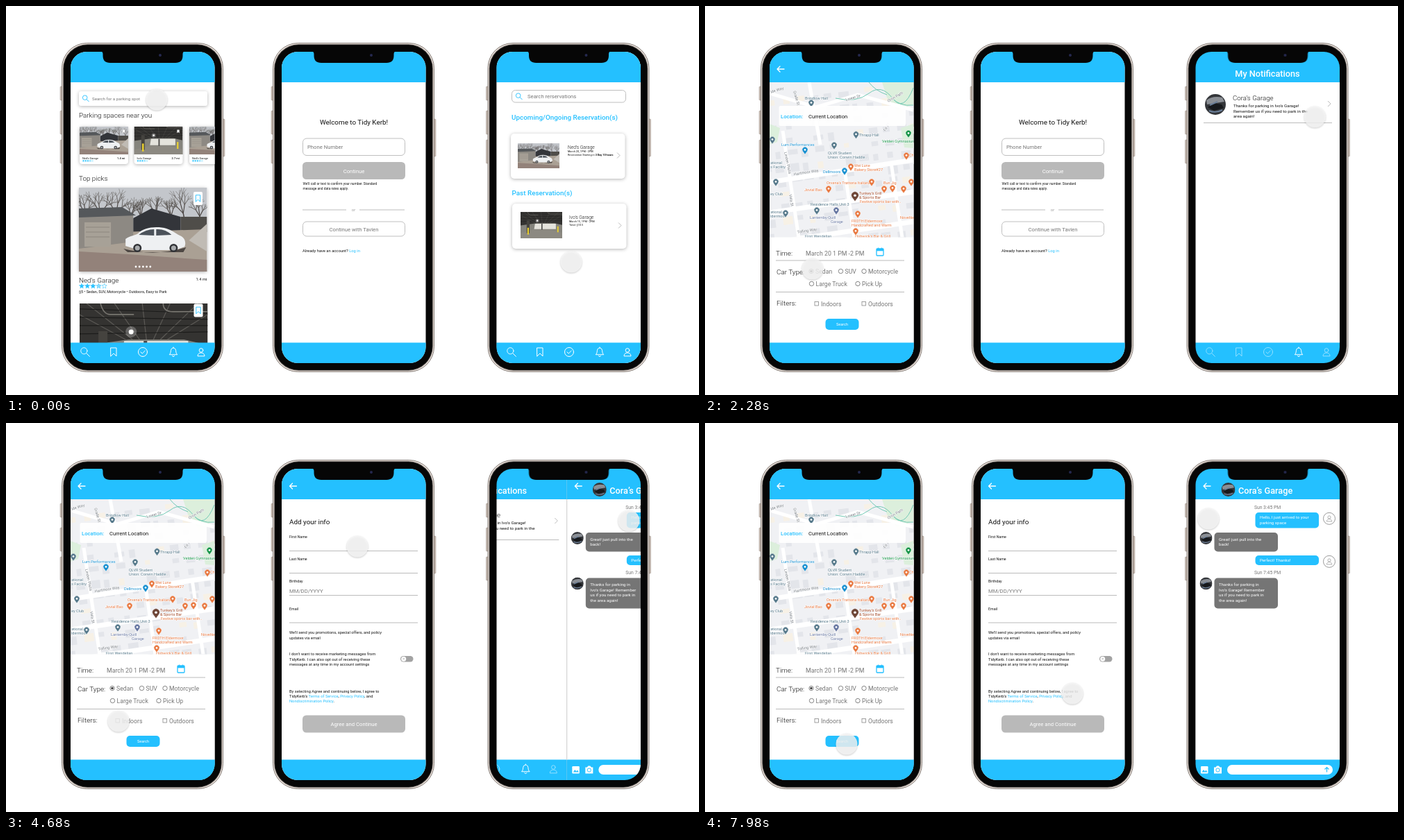
An HTML page for the animation above (8 s loop, 998 by 561 pixels).

```html
<!DOCTYPE html>
<html lang="en">
<head>
<meta charset="utf-8">
<title>Parking app screens</title>
<style>
html, body { margin: 0; width: 100%; height: 100%; overflow: hidden; background: #fff; }
#stage { display: block; width: 100%; height: 100%; }
text { font-family: Roboto, sans-serif; fill: #111; white-space: pre; }
.light { font-weight: 300; }
.medium { font-weight: 500; }
.mid { text-anchor: middle; }
text.blue, tspan.blue { fill: #24c0ff; }
text.gray { fill: #777; }
text.white { fill: #fff; }
.map text { paint-order: stroke; stroke: #fff; stroke-width: 1px; }
.blueFill { fill: #24c0ff; }
.line { fill: none; stroke: #aaa; stroke-width: .8; }
.icon { fill: none; stroke: #fff; stroke-width: 1; stroke-linejoin: round; stroke-linecap: round; }
.card { fill: #fff; filter: drop-shadow(0 1px 2.5px rgba(0,0,0,.3)); }
.touch { fill: #f6f6f6; fill-opacity: .82; filter: drop-shadow(0 1.5px 1.2px rgba(0,0,0,.24)); }

#sheet, #strip, #reservations, #welcome, #info, #hint, #arrow, #touch1, #touch2, #touch3, #touch2Show {
  animation: 8s ease-in-out infinite;
}
#sheet { animation-name: sheet; }
#strip { animation-name: strip; }
#reservations { animation-name: reservations; }
#welcome { animation-name: welcome; }
#info, #touch2Show { animation-name: info; }
#hint { animation-name: hint; }
#arrow { animation-name: arrow; }
#touch1 { animation-name: touch1; }
#touch2 { animation-name: touch2; }
#touch3 { animation-name: touch3; }

@keyframes sheet {
  0% { transform: translateY(449px); }
  7.52% { transform: translateY(449px); animation-timing-function: ease-out; }
  11.27%, 100% { transform: none; }
}
@keyframes strip {
  0% { transform: translateX(0); }
  57.19% { transform: translateX(0); animation-timing-function: ease-out; }
  60.94%, 100% { transform: translateX(-208px); }
}
@keyframes reservations { 0%, 18.74% { visibility: visible; } 18.75%, 100% { visibility: hidden; } }
@keyframes welcome { 0%, 48.74% { visibility: visible; } 48.75%, 100% { visibility: hidden; } }
@keyframes info { 0%, 48.74% { visibility: hidden; } 48.75%, 100% { visibility: visible; } }
@keyframes hint { 0%, 41.5% { opacity: 0; } 42.5%, 44.5% { opacity: .65; } 46%, 100% { opacity: 0; } }
@keyframes arrow {
  0%, 37.99% { visibility: hidden; }
  38%, 48.74% { visibility: visible; }
  48.75%, 100% { visibility: hidden; }
}
@keyframes touch1 {
  0%, 11.5% { transform: translate(217px, 135px); }
  15%, 20% { transform: translate(192px, 294px); }
  30%, 36% { transform: translate(153px, 383px); }
  41%, 46% { transform: translate(188px, 388px); }
  58.5% { transform: translate(162px, 430px); }
  70.1%, 77% { transform: translate(172px, 434px); }
  90%, 100% { transform: translate(204px, 463px); }
}
@keyframes touch2 {
  0%, 49% { transform: translate(500px, 240px); }
  57%, 60% { transform: translate(506px, 178px); }
  69%, 75% { transform: translate(504px, 252px); }
  97%, 100% { transform: translate(529px, 390px); }
}
@keyframes touch3 {
  0%, 1% { transform: translate(814px, 369px); }
  8.6% { transform: translate(866px, 521px); }
  12%, 18% { transform: translate(858px, 501px); }
  30%, 43.2% { transform: translate(879px, 149px); }
  48%, 59% { transform: translate(897px, 141px); }
  70%, 75% { transform: translate(832px, 206px); }
  92%, 100% { transform: translate(725px, 138px); }
}
</style>
</head>
<body>
<svg id="stage" viewBox="0 0 998 561"></svg>
<script>
let seed = 48271;
const rand = (a, b) => {
  seed = (seed * 16807) % 2147483647;
  return a + (b - a) * seed / 2147483647;
};
const repeat = (n, fn) => Array.from({ length: n }, (_, i) => fn(i)).join('');
const text = (x, y, size, str, cls = '') =>
  `<text x="${x}" y="${y}" font-size="${size}" class="${cls}">${str}</text>`;
const lines = (x, y, step, size, list, cls) =>
  list.map((str, i) => text(x, y + i * step, size, str, cls)).join('');
const rect = (x, y, w, h, r = 0, attrs = '') =>
  `<rect x="${x}" y="${y}" width="${w}" height="${h}" rx="${r}" ${attrs}/>`;
const circle = (x, y, r, attrs = '') => `<circle cx="${x}" cy="${y}" r="${r}" ${attrs}/>`;
const path = (d, attrs = '') => `<path d="${d}" ${attrs}/>`;
const at = (x, y, body, attrs = '') => `<g transform="translate(${x} ${y})" ${attrs}>${body}</g>`;
const layer = (id, body) => `<g id="${id}">${body}</g>`;
const rule = (x1, x2, y) => path(`M${x1} ${y}H${x2}`, 'class="line"');
const photo = (id, x, y, w, h) =>
  `<use href="#${id}" x="${x}" y="${y}" width="${w}" height="${h}"/>`;
const outline = 'fill="#fff" stroke="#b8b8b8" stroke-width=".9"';
const blue = 'class="blueFill"';

const page = x => rect(x, 66, 208, 449, 0, 'fill="#fff"');
const bars = x => rect(x, 66, 208, 44, 0, blue) + rect(x, 485.5, 208, 30, 0, blue);
const backArrow = x =>
  path(`M${x + 5} 91h-10m4 -4l-4 4l4 4`, 'class="icon" style="stroke-width:1.3"');
const chevron = (x, y) =>
  path(`M${x - 2} ${y - 4}l4 4l-4 4`, 'fill="none" stroke="#aaa" stroke-width=".8"');
const lens = (x, y, r, color) =>
  path(`M${x + r * .5} ${y + r * .5}l${r} ${r}`, `stroke="${color}"`) +
  circle(x - r * .25, y - r * .25, r, `fill="none" stroke="${color}" stroke-width=".9"`);
const person = (x, y, attrs = '') =>
  at(x, y, circle(0, -2.5, 2.8) + path('M-5 5.5C-5 -.5 5 -.5 5 5.5Z'), attrs);
const bookmark = (x, y, s, attrs = '') =>
  path(`M${x - 4 * s} ${y - 6 * s}h${8 * s}v${12 * s}l${-4 * s} ${-4 * s}l${-4 * s} ${4 * s}z`, attrs);
const starPath = (x, y, r) => 'M' + Array.from({ length: 10 }, (_, i) => {
  const a = -Math.PI / 2 + i * Math.PI / 5, d = i % 2 ? r * .42 : r;
  return `${(x + d * Math.cos(a)).toFixed(2)} ${(y + d * Math.sin(a)).toFixed(2)}`;
}).join('L') + 'Z';
const stars = (x, y, r) => repeat(5, i => path(starPath(x + i * r * 2.15, y, r),
  `fill="${i < 3 ? '#24c0ff' : i < 4 ? '#91dfff' : '#fff'}" stroke="#24c0ff" stroke-width="${r * .14}"`));
const bell = path('M235.5 502.5c2 -1.5 1.5 -4 2 -6c.7 -4.5 6.3 -4.5 7 0c.5 2 0 4.5 2 6z' +
  'M239.5 504.5a1.6 1.6 0 0 0 3 0M241 493v-1');
const nav = (dx, opacity = 1) => at(dx, 0,
  `<g opacity="${opacity}">${lens(113.5, 498.5, 4.6, '#fff')}${bookmark(155, 499, 1)}` +
  circle(197, 499, 6.5) + path('M194 499l2.2 2.2l4 -4') + person(281, 499) + '</g>' + bell,
  'class="icon"');
const touch = id => circle(0, 0, 15.5, `id="${id}" class="touch"`);

/* photographs */
const branch = (x, y, length, angle, depth) => {
  const x2 = x + length * Math.cos(angle), y2 = y + length * Math.sin(angle);
  return path(`M${x.toFixed(1)} ${y.toFixed(1)}L${x2.toFixed(1)} ${y2.toFixed(1)}`,
    `stroke="#4a4441" stroke-width="${.4 + depth * .35}"`) +
    (depth ? repeat(3, i => branch(x2, y2, length * rand(.6, .85), angle + (i - 1) * .5 + rand(-.2, .2), depth - 1)) : '');
};
const trees = repeat(9, i => branch(10 + i * 20.5, 56, rand(14, 22), -Math.PI / 2 + rand(-.2, .2), 3));
const lot = `<symbol id="lot" viewBox="0 0 184 121" preserveAspectRatio="xMidYMid slice">
  ${rect(0, 0, 184, 121, 0, 'fill="#c3c6cb"')}
  ${trees}
  ${path('M78 44L104 30L146 42V72H78Z', 'fill="#33353a"')}
  ${rect(146, 42, 38, 22, 0, 'fill="#4f4d49"')}
  ${path('M0 66L184 60V121H0Z', 'fill="#aaa094"')}
  ${path('M0 92L70 96L184 104V121H0Z', 'fill="#93827a"')}
  ${path('M184 52L158 76L184 92Z', 'fill="#c0bbb4"')}
  ${path('M0 38H78V78L0 88Z', 'fill="#8d8983"')}
  ${path('M0 30L62 28L82 40L0 43Z', 'fill="#55585b"')}
  ${rect(8, 50, 38, 35, 0, 'fill="#a7a197"')}
  ${path('M10 57h34M10 64h34M10 71h34', 'stroke="#817b73" stroke-width=".7"')}
  ${path('M64 88Q110 100 154 86L150 93H70Z', 'fill="#4d4743"')}
  ${path('M67 74C74 69 81 69 85 66C93 57 112 55 126 59C135 62 140 67 147 70Q155 75 152 85L139 90L86 90L67 84Z', 'fill="#eef0f2"')}
  ${path('M86 68Q96 60 108 60V69ZM111 60Q124 59 133 68L111 69Z', 'fill="#4b525a"')}
  ${[84, 136].map(x => circle(x, 87, 6, 'fill="#303236"') + circle(x, 87, 3.5, 'fill="#a8abad"')).join('')}
</symbol>`;
const deck = `<symbol id="deck" viewBox="0 0 184 121" preserveAspectRatio="xMidYMid slice">
  ${rect(0, 0, 184, 121, 0, 'fill="#343331"')}
  ${path('M0 62L70 52H150L184 60V96L120 84H60L0 98Z', 'fill="#85847d"')}
  ${path('M64 54H156V78H60Z', 'fill="#e4e3dc"')}
  ${path('M0 96L60 80H130L184 94V121H0Z', 'fill="#8c8981"')}
  <g fill="none" stroke="#5c5a56" stroke-width="1.2">
    ${repeat(7, i => path(`M${-30 + i * 40} 0L${66 + i * 10} 52`))}
    ${repeat(4, i => path(`M0 ${8 + i * 12}L184 ${14 + i * 9}`, 'stroke="#1c1c1b"'))}
  </g>
  ${path('M30 0q4 16 14 16h34M120 0q0 12 14 12h50', 'fill="none" stroke="#77756f" stroke-width="1.6"')}
  ${circle(74, 41, 8, 'fill="#fff" opacity=".25"')}${circle(74, 41, 3.5, 'fill="#fff"')}
  ${rect(92, 54, 5, 27, 0, 'fill="#4c4b49"')}${rect(27, 40, 13, 56, 0, 'fill="#45433f"')}
  ${rect(30, 72, 7, 30, 0, 'fill="#e8cf31"')}${rect(162, 66, 6, 26, 0, 'fill="#e8cf31"')}
</symbol>`;
const avatar = `<symbol id="avatar" viewBox="-15 -15 30 30">
  ${circle(0, 0, 15, 'fill="#34363a"')}
  ${path('M-13 -6Q-4 -13 10 -10L13 -4L-12 0Z', 'fill="#8b8f95"')}
  ${path('M-11 4L-3 -2L9 0L12 5L-2 9Z', 'fill="#17191c"')}
  ${path('M-9 9Q0 13 10 8M-8 1L3 -4', 'stroke="#6b7f99" stroke-width="2" fill="none"')}
</symbol>`;

/* home */
const spot = (x, id, name, miles) => rect(x, 174, 70, 54, 4, 'class="card"') +
  photo(id, x, 174, 70, 40) + bookmark(x + 63.5, 181, .4, 'fill="#fff"') +
  text(x + 4, 220.5, 3.9, name) + text(x + 54, 220.5, 4, miles, 'medium') + stars(x + 5.5, 223.3, 1.5);
const badge = (x, y) => rect(x, y, 13, 19, 2, 'fill="#fff"') +
  bookmark(x + 6.5, y + 9.5, .8, 'fill="none" stroke="#24c0ff" stroke-width=".9"');
const home = page(93) +
  rect(105, 123, 185, 21, 3, 'class="card"') + lens(114.5, 133, 3.3, '#24c0ff') +
  text(124, 135.8, 6.2, 'Search for a parking spot', 'gray') +
  text(105, 160.5, 9.85, 'Parking spaces near you', 'light') +
  spot(106, 'lot', 'Ned’s Garage', '1.4 mi') + spot(184.5, 'deck', 'Ivo’s Garage', '2.7 mi') +
  spot(264, 'lot', 'Ned’s Garage', '1.4 mi') +
  text(105, 251.5, 9.9, 'Top picks', 'light') +
  rect(105, 262, 184.5, 121, 4, 'class="card"') +
  photo('lot', 105, 262, 184.5, 121) + badge(270, 268) +
  repeat(5, i => circle(187 + i * 5.2, 376, 1.4, 'fill="#fff"')) +
  text(105, 398.5, 9.9, 'Ned’s Garage', 'light') + text(273.5, 396, 5.8, '1.4 mi') +
  stars(109, 404, 3.8) +
  text(105, 414, 5.45, '$5 • Sedan, SUV, Motorcycle • Outdoors, Easy to Park') +
  photo('deck', 106, 429, 184.5, 121) + badge(270.5, 429.5) + bars(93) + nav(0);

/* map */
const pin = (x, y, color, s = 1) => at(x, y,
  path(`M0 ${6 * s}L${-3.3 * s} ${1.5 * s}A${4 * s} ${4 * s} 0 1 1 ${3.3 * s} ${1.5 * s}Z`,
    `fill="${color}" stroke="#fff" stroke-width=".5"`) + circle(0, -.6 * s, 1.4 * s, 'fill="#fff"'));
const label = (x, y, color, ...list) =>
  lines(x, y, 6, 5.6, list).replaceAll('<text', `<text style="fill:${color}"`);
const street = (x, y, turn, name) =>
  `<g transform="translate(${x} ${y}) rotate(${turn})">${label(0, 0, '#777d84', name)}</g>`;
const slate = '#55788a', orange = '#e87840', sky = '#168fd0', green = '#159447', violet = '#6575a0';
const buildings = repeat(13, r => repeat(12, c => {
  if (rand(0, 1) < .25) return '';
  const x = 80 + c * 20 + rand(0, 4), y = 122 + r * 19 + rand(0, 4);
  return rect(x, y, rand(7, 15), rand(6, 12), 0, `fill="${rand(0, 1) < .2 ? '#f7f1e6' : '#e3e5ea'}"`);
}));
const map = `<g class="map" clip-path="url(#mapArea)">
  ${rect(93, 110, 208, 224, 0, 'fill="#f0f1f4"')}
  <g transform="rotate(-7 196 222)">${buildings}</g>
  ${path('M255 110L300 110V142L276 150L262 132ZM93 170L108 176L104 196L93 200ZM282 176L300 170V205L287 204Z', 'fill="#dcefdc"')}
  <g fill="none" stroke="#fff" stroke-width="5">
    ${path('M93 254L300 222M93 298L300 268M93 342L300 311', 'stroke-width="7"')}
    ${path('M112 180L135 334M201 236L215 334M268 226L284 334M93 126L160 146L220 128L300 150M150 110L166 200')}
  </g>
  ${path('M188 133Q218 140 236 126T270 133T300 118M236 110Q245 122 262 128M270 133Q280 145 300 143', 'fill="none" stroke="#72c9b4" stroke-width="1"')}
  ${street(95, 126, -18, 'lde Way')}${street(127, 123, 74, 'Grade St')}${street(203, 137, -16, 'Lower Dr')}
  ${street(264, 139, -30, 'Orrin Path')}${street(128, 244.5, -9, 'Hartmoor Way')}
  ${street(114, 211, 78, 'Linden Plaza')}${street(121, 272, 80, 'Vela St')}${street(133, 328, -9, 'Tolling Way')}
  ${street(260, 181, -60, 'Fir Pl')}
  ${label(144, 135, slate, 'Brindlow Hall')}${pin(153, 140, slate)}
  ${label(222, 188, slate, 'Thrapp Hall')}${pin(217.5, 185.5, slate)}
  ${label(255, 196.5, green, 'Velden Gymnasium')}${pin(293, 184, green)}
  ${label(110, 201.5, sky, 'Lum Performances')}${pin(144, 208, sky)}
  ${label(177, 213.5, slate, 'QLVR Student', 'Union: Corwin Haddle...')}${pin(186, 201, slate)}
  ${label(170, 240.5, sky, 'Dellmoors')}${pin(201, 238, sky)}
  ${label(215, 232, orange, 'Wei Lune', 'Bakery Store#27')}${pin(210, 232, orange)}
  ${label(175, 257, orange, 'Orvena’s Trattoria Italiana')}${pin(240, 254, orange)}
  ${label(257, 256.5, orange, 'Bun Jig')}${pin(258, 264, orange)}
  ${label(143, 266.5, orange, 'Jovial Bao')}${pin(178, 264, orange)}
  ${label(294, 217, orange, 'Ch')}${pin(290, 216, orange)}
  ${pin(270, 263, orange)}${pin(286, 264, orange)}${pin(297, 254, orange)}
  ${label(94, 228, slate, 'ational', 's Facility')}${pin(97, 193, slate)}${pin(102, 254, slate)}
  ${label(94, 273, slate, 'ey Club')}${label(94, 299, slate, 'ational', 'ldermoor')}${pin(116, 299, slate)}
  ${label(152, 288, slate, 'Residence Halls Unit 3')}${pin(161, 295, slate)}
  ${label(151, 307, violet, 'Lanternby-Quill')}${label(181, 313, violet, 'Garage')}${pin(189, 295, violet)}
  ${label(211, 312, orange, 'FROTH Eldermoor', 'Handcrafted and Warm')}${pin(220, 300, orange)}
  ${label(281, 307, orange, 'Novelties')}
  ${label(216, 333.5, orange, 'Hobwick’s Bar &amp; Grill')}${pin(217, 325, orange)}
  ${label(144, 333.5, slate, 'First Wendelian')}
  ${label(222, 272, '#a34d2d', 'Tunkey’s Grill', '&amp; Sports Bar')}${label(223, 283.5, orange, 'Festive sports bar with..')}
  ${pin(216, 274, '#6e4637', 1.3)}
</g>`;

/* search sheet */
const radio = (x, y, name, on) => circle(x, y, 3.2, 'fill="#fff" stroke="#777" stroke-width=".9"') +
  (on ? circle(x, y, 1.8, 'fill="#444"') : '') + text(x + 6, y + 3.3, 8.7, name, 'gray');
const box = (x, name) => rect(x, 426.5, 5.5, 5.5, 0, 'fill="#fff" stroke="#888" stroke-width=".8"') +
  text(x + 9, 432.7, 8.7, name, 'gray');
const calendar = rect(247, 350, 10, 10, 1, 'fill="#fff" stroke="#24c0ff" stroke-width="1.3"') +
  rect(247, 350, 10, 3.3, 0, blue) + path('M249.5 348.5v2M254.5 348.5v2', 'stroke="#24c0ff"');
const search = page(93) + map + bars(93) + backArrow(109) +
  rect(106.5, 144, 182.5, 29, 2, 'fill="#fff" opacity=".93"') +
  text(109, 161.5, 7.7, 'Location:', 'blue medium') + text(149, 161.5, 7.6, 'Current Location') +
  text(102, 360, 9.9, 'Time:', 'light') + text(145, 359.5, 8.8, 'March 20 1 PM -2 PM', 'gray') + calendar +
  rule(102, 287, 367) + text(103, 387, 9.9, 'Car Type:', 'light') +
  radio(153, 382.5, 'Sedan', true) + radio(195.5, 382.5, 'SUV') + radio(229, 382.5, 'Motorcycle') +
  radio(153.5, 400.5, 'Large Truck') + radio(220, 400.5, 'Pick Up') + rule(102, 287, 412.5) +
  text(103, 432, 9.9, 'Filters:', 'light') + box(158, 'Indoors') + box(226, 'Outdoors') +
  rect(173.5, 451, 48, 16, 5, blue) + text(197.5, 460.8, 5.5, 'Search', 'white mid');

/* sign up */
const button = (y, name) => rect(427, y, 148, 25, 5.5, 'fill="#b9b9b9"') +
  text(501, y + 15.8, 7.7, name, 'white mid');
const welcome = page(397) + bars(397) +
  text(501, 170.5, 9.9, 'Welcome to Tidy Kerb!', 'mid') +
  rect(427.5, 191, 147, 24.5, 5.5, outline) + text(434, 206.3, 7.7, 'Phone Number', 'gray') +
  button(225, 'Continue') +
  lines(427.5, 258.2, 6.3, 4.85, ['We’ll call or text to confirm your number. Standard', 'message and data rates apply.']) +
  rule(427, 490, 294) + rule(509, 574, 294) + text(500.5, 296, 6, 'or', 'mid light gray') +
  rect(427.5, 311, 147, 21, 5.5, outline) + text(501, 324.6, 7.7, 'Continue with Tavlen', 'gray mid') +
  text(427, 355, 5.8, 'Already have an account? <tspan class="blue">Log in</tspan>');
const field = (y, name) => text(408, y, 5.3, name) + rule(408, 593, y + 18.5);
const link = str => `<tspan class="blue">${str}</tspan>`;
const info = page(397) + bars(397) + backArrow(413.5) +
  text(408, 146.3, 9.9, 'Add your info') +
  field(166, 'First Name') + field(198, 'Last Name') + field(230, 'Birthday') +
  text(408, 245, 7.7, 'MM/DD/YYYY', 'gray') + field(269.5, 'Email') +
  lines(408, 304.3, 7.2, 5.75, ['We’ll send you promotions, special offers, and policy', 'updates via email']) +
  lines(408, 335.3, 7.2, 5.75, ['I don’t want to receive marketing messages from',
    'TidyKerb. I can also opt out of receiving these', 'messages at any time in my account settings']) +
  rect(568, 336, 18.5, 8.5, 4.2, 'fill="#a3a3a3"') + circle(572.7, 340.25, 3.5, 'fill="#fff"') +
  path('M571.5 339l2.4 2.4m0 -2.4l-2.4 2.4', 'stroke="#999" stroke-width=".6"') +
  lines(408, 388.8, 7.2, 5.75, ['By selecting Agree and continuing below, I agree to',
    `TidyKerb’s ${link('Terms of Service')}, ${link('Privacy Policy')}, and`,
    `${link('Nondiscrimination Policy')}.`]) +
  button(421.5, 'Agree and Continue');

/* reservations, notifications, chat */
const booking = (x, y, name, ...notes) => rect(x, y, 164.5, 65, 5, 'class="card"') +
  text(x + 82, y + 22, 6.7, name, 'light') + lines(x + 82, y + 27.3, 4.5, 3.85, notes) +
  chevron(x + 155, y + 31.5);
const reservations = page(706) + bars(706) + nav(614) +
  rect(728.5, 121.5, 164, 17.5, 5, outline) + lens(738.5, 130, 3.3, '#24c0ff') +
  text(751, 133, 7.7, 'Search rerservations', 'gray') +
  text(728, 163.5, 9.9, 'Upcoming/Ongoing Reservation(s)', 'blue medium') +
  booking(727, 184, 'Ned’s Garage', 'March 20, 1PM - 2PM',
    'Reservation Starting in <tspan font-weight="700">3 Day 10 hours</tspan>') + photo('lot', 737, 198, 60, 36) +
  text(728.5, 272.5, 9.9, 'Past Reservation(s)', 'blue medium') +
  booking(729, 285, 'Ivo’s Garage', 'March 15, 1PM - 2PM', 'Total: $10.5') + photo('deck', 741, 297, 60, 38);

const face = (x, y, r) => photo('avatar', x - r, y - r, r * 2, r * 2);
const notifications = page(706) + bars(706) + nav(614, .5) +
  text(810, 101.5, 12.7, 'My Notifications', 'white medium mid') + face(735, 142, 15) +
  text(760, 135.5, 9.7, 'Cora’s Garage', 'light') +
  lines(761, 146.3, 7.4, 6.2, ['Thanks for parking in Ivo’s Garage!', 'Remember us if you need to park in the', 'area again!']) +
  rule(718, 903, 168.5) + chevron(899, 141) + rect(893, 137, 9, 9, 0, 'id="hint" fill="#24a8e8"');

const bubble = (x, y, h, color, offset, ...list) => rect(x, y, 91.5, h, 5, `fill="${color}"`) +
  lines(x + 6.5, y + offset, 7.6, 6.15, list, 'white');
const sent = (y, h, ...list) => bubble(792.5, y, h, '#24c0ff', 9, ...list) +
  at(899, y + 8.8, circle(0, 0, 8.5) + `<g transform="scale(.75)">${person(0, 0)}</g>`, 'fill="none" stroke="#999"');
const received = (y, h, ...list) => face(721.5, y + 8, 9) + bubble(733.5, y, h, '#757575', 11.5, ...list);
const messageBar =
  rect(714, 495, 10.5, 10.5, 1.2, 'fill="#fff"') + path('M715.5 503.5l2.5 -3.5l2 2.5l1.5 -2l2 3z', blue) +
  path('M733 496.5h2.5l1.5 -2h3l1.5 2h2.5v9h-11z', 'fill="#fff"') +
  circle(738.5, 500.5, 2.6, 'fill="none" stroke="#24c0ff"') + rect(752, 493, 152, 14, 7, 'fill="#fff"') +
  path('M895.5 503.5v-7m-3 3l3 -3l3 3', 'fill="none" stroke="#24c0ff" stroke-width="1.2"');
const chat = page(706) + bars(706) + backArrow(723) + face(753.5, 96, 10) +
  text(768, 101.5, 12.7, 'Cora’s Garage', 'white medium') +
  text(810, 124, 6.8, 'Sun 3:45 PM', 'gray mid') +
  sent(129, 22.5, 'Hello, I just arrived to your', 'parking space') +
  received(158, 27.5, 'Great! just pull into the', 'back!') +
  sent(191, 14, 'Perfect! Thanks!') +
  text(810, 217.5, 6.8, 'Sun 7:45 PM', 'gray mid') +
  received(223.5, 44, 'Thanks for parking in', 'Ivo’s Garage! Remember', 'us if you need to park in', 'the area again!') +
  messageBar + path('M706.5 110V486', 'stroke="#ddd"');

/* phone */
const sideKey = (x, y, h) => rect(x, y, 3, h, 1, 'fill="#c9bcb3" stroke="#857a73" stroke-width=".4"');
const frame = sideKey(78, 116, 20) + sideKey(78, 151, 34) + sideKey(78, 193, 34) + sideKey(312, 163, 54) +
  rect(80.5, 53.5, 232, 474, 36, 'fill="#e6ddd7" stroke="#6b625c" stroke-width=".8"') +
  rect(82.3, 55.3, 228.4, 470.4, 35, 'fill="#3b3836"') + rect(83.3, 56.3, 226.4, 468.4, 34, 'fill="#060606"');
const notch = path('M137 65.5q2.5 .5 2.5 4v2q0 10.5 10.5 10.5h94q10.5 0 10.5 -10.5v-2q0 -3.5 2.5 -4z', 'fill="#060606"') +
  circle(222, 71, 2, 'fill="#25294f"');
const phone = (dx, body) => at(dx, 0, frame +
  `<g clip-path="url(#screen)">${at(-dx, 0, body)}</g>` + notch);

document.getElementById('stage').innerHTML = `<defs>
    <clipPath id="screen">${rect(93, 66, 207.5, 449, 23)}</clipPath>
    <clipPath id="mapArea">${rect(93, 110, 208, 223.5)}</clipPath>
    ${lot}${deck}${avatar}
  </defs>` +
  phone(0, home + layer('sheet', search)) +
  phone(304, layer('welcome', welcome) + layer('info', info)) +
  phone(613.5, layer('strip', notifications + at(208, 0, chat)) + layer('reservations', reservations)) +
  touch('touch1') + layer('touch2Show', touch('touch2')) + touch('touch3') +
  layer('arrow', path('M495 243v10l2.4 -2.2l1.7 3.8l1.8 -.8l-1.7 -3.7h3.2z',
    'fill="#000" stroke="#fff" stroke-width=".6"'));
</script>
</body>
</html>
```
